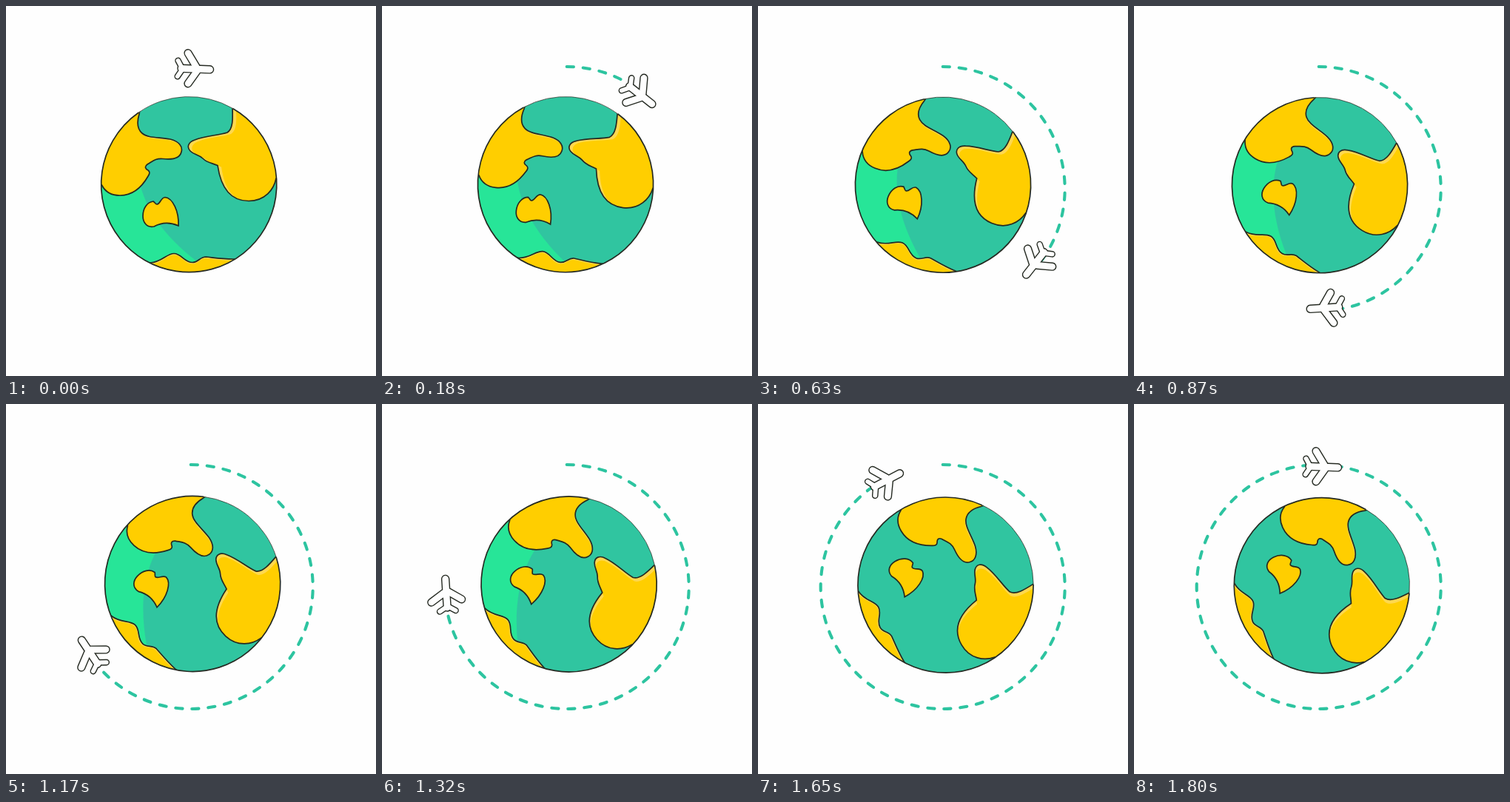
These frames come from a looping animation (500x500 px, 1860 ms). An HTML page with a canvas:

```html
<!DOCTYPE html>
<html lang="en">
<head>
<meta charset="utf-8">
<title>Round the world</title>
<style>
  html, body { margin: 0; width: 100%; height: 100%; overflow: hidden; background: #fefefe; }
  canvas { display: block; width: 500px; height: 500px; }
</style>
</head>
<body>
<canvas id="stage" width="500" height="500"></canvas>
<script>
const ctx = document.getElementById('stage').getContext('2d');

const LOOP = 1860, STEP = 30, LAST = 60;
const GLINT_END = 45;            // step at which the bright sea disappears
const SPIN = 65;                 // degrees the globe turns per loop
const INK = '#252a22', SEA = '#30c5a0', BRIGHT = '#27e598';
const LAND = '#ffce00', PALE = '#ffd84f', TRAIL = '#2dc4a0';

const globe = { x: 247.2, y: 241.1, r: 118.6 };
const pivot = { x: 247.3, y: 248.4 };
const ring = { x: 249.7, y: 247, r: 165 };
const flight = { x: 248.4, y: 246.6 };
const dash = 2 * Math.PI * ring.r / 47;
const rad = deg => deg * Math.PI / 180;

const disc = new Path2D();
disc.arc(globe.x, globe.y, globe.r, 0, 2 * Math.PI);

// Lands run past the rim; the disc clips them. Gloss is the offset of the pale edge.
const lands = [
  { gloss: [1, 2], d: 'M184 120 L180 146 C177 156 177 166 184 172 C192 179 208 177 222 180 C234 183 239 190 237 197 C235 206 226 208 212 206.5 C202 205.5 198 210 191 214 C187 217 188 220 192 222 C195 224 194 227 192 230 C184 244 172 256 154 256 C142 256 134 251 129.5 242 L100 225 L100 110 Z' },
  { gloss: [5, 2], d: 'M305 115 L306 138 C306.5 152 307 166 299 171 C287 175 270 175 255 181 C246 184 244 191 249 196 C254 201 261 201 266 206 C272 212 278 212 286 215.5 C289 236 297 263.5 328 263.5 C350 263.5 362 248 365 233 L390 215 L390 115 Z' },
  { gloss: [0, 0], d: 'M204 268 C209 267 209 259 215 258.5 C225 259.5 234 277 233 297 C222 292 211 292 200 298 C190 300 185 292 185 284 C185 273 191 265 199 264 C201 265 202 268 204 268 Z' },
  { gloss: [0, 2], d: 'M170 349 L195 347 C211 346 217 334.5 227 334.5 C237 334.5 241 346.5 252 346.5 C260 346.5 262 339 270 339 C280 340 292 342 307 342 L330 342 L330 380 L170 380 Z' }
].map(({ gloss, d }) => ({ gloss, path: new Path2D(d) }));

const glint = new Path2D('M178 225 C184 270 212 310 258 345 L247 380 L100 380 L100 225 Z');

// Plane parts: x1, y1, x2, y2, thickness
const limbs = [
  [237, 84.3, 275.5, 85.8, 11.5],
  [246, 63.7, 257, 82, 11.3],
  [246, 104.8, 258, 88, 11.3],
  [232.5, 73.7, 238, 84, 8.6],
  [231.7, 95.2, 238, 86, 8.6]
];

function turn(center, deg) {
  ctx.translate(center.x, center.y);
  ctx.rotate(rad(deg));
  ctx.translate(-center.x, -center.y);
}

function paint(path, color) {
  ctx.fillStyle = color;
  ctx.fill(path);
}

function drawLand({ path, gloss }) {
  ctx.save();
  ctx.clip(path);
  paint(path, PALE);
  ctx.translate(...gloss);
  paint(path, LAND);
  ctx.restore();
  ctx.strokeStyle = INK;
  ctx.lineWidth = 1.7;
  ctx.stroke(path);
}

function drawRim(from, to, width) {
  ctx.beginPath();
  ctx.arc(globe.x, globe.y, globe.r, rad(from), rad(to));
  ctx.strokeStyle = INK;
  ctx.lineWidth = width;
  ctx.stroke();
}

function drawGlobe(step) {
  ctx.save();
  turn(pivot, SPIN * step / LAST);
  ctx.save();
  ctx.clip(disc);
  paint(disc, SEA);
  if (step < GLINT_END) paint(glint, BRIGHT);
  lands.forEach(drawLand);
  ctx.restore();
  drawRim(-60, 235, 1.7);
  drawRim(-125, -60, 0.7);
  ctx.restore();
}

function drawTrail(deg) {
  if (!deg) return;
  ctx.save();
  ctx.setLineDash([dash * 0.42, dash * 0.58]);
  ctx.lineCap = 'round';
  ctx.lineWidth = 4.1;
  ctx.strokeStyle = TRAIL;
  ctx.beginPath();
  ctx.arc(ring.x, ring.y, ring.r, rad(-90), rad(deg - 90));
  ctx.stroke();
  ctx.restore();
}

function drawLimbs(color, inset) {
  ctx.strokeStyle = color;
  for (const [x1, y1, x2, y2, size] of limbs) {
    ctx.lineWidth = size - inset;
    ctx.beginPath();
    ctx.moveTo(x1, y1);
    ctx.lineTo(x2, y2);
    ctx.stroke();
  }
}

function drawPlane(deg) {
  ctx.save();
  turn(flight, deg);
  ctx.lineCap = 'round';
  drawLimbs(INK, 0);
  drawLimbs('#fefefe', 2.8);
  ctx.restore();
}

const start = performance.now();

function frame() {
  const time = (performance.now() - start) % LOOP;
  const step = Math.min(LAST, Math.floor(time / STEP));
  const deg = 360 * step / LAST;
  ctx.fillStyle = '#fefefe';
  ctx.fillRect(0, 0, 500, 500);
  drawGlobe(step);
  drawTrail(deg);
  drawPlane(deg);
  requestAnimationFrame(frame);
}
frame();
</script>
</body>
</html>
```
